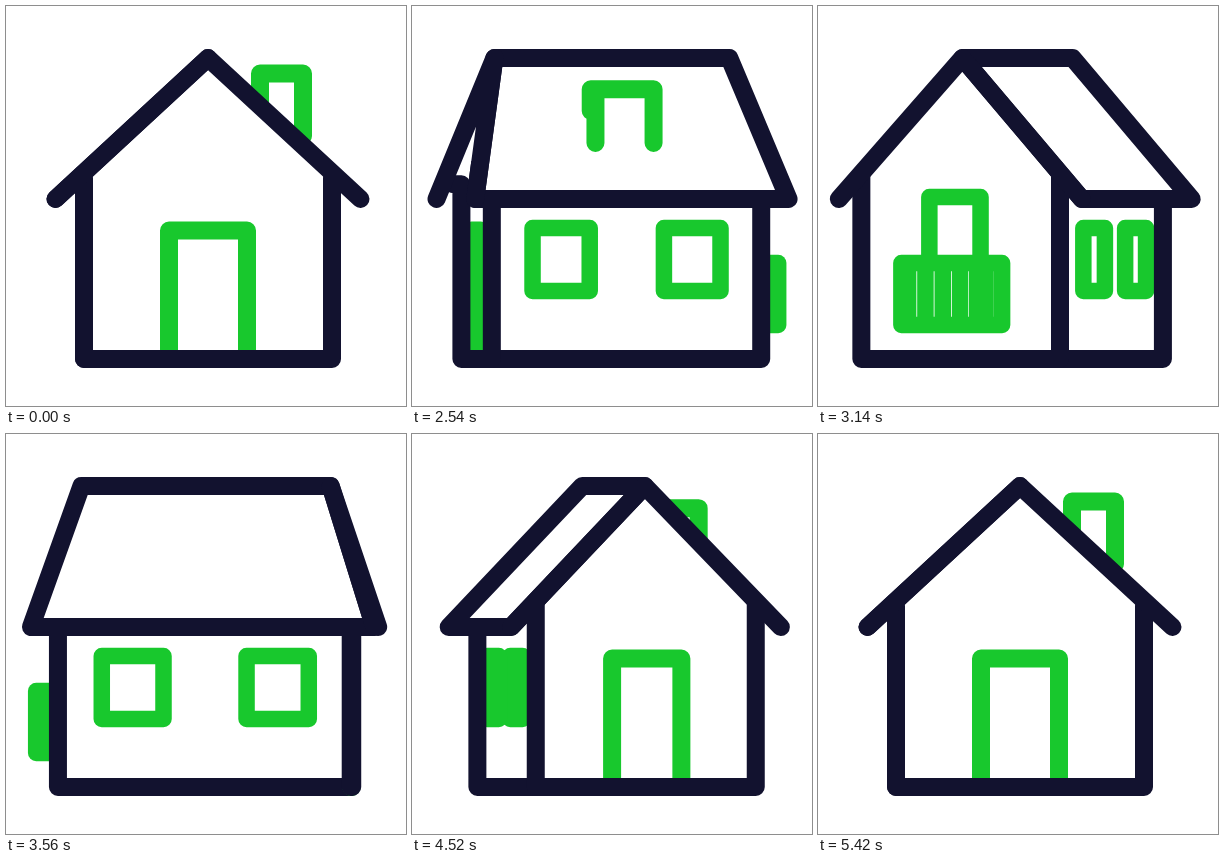
These frames come from a looping animation (400 px wide and 400 px high, 5.45 s). An HTML page:

```html
<!DOCTYPE html>
<html lang="en">
<head>
<meta charset="utf-8">
<title>Turning house</title>
<style>
  html, body { margin: 0; width: 100%; height: 100%; overflow: hidden; background: #fff; }
  svg { display: block; width: 100vw; height: 100vh; }
  path { stroke-linecap: round; stroke-linejoin: round; }
</style>
</head>
<body>
<svg viewBox="0 0 400 400"><g id="house"></g></svg>
<script>
const NAVY = '#12122f', GREEN = '#18c82d';
const LOOP = 5450, START = 2030, TURN = 3390, STEP = 30;
const RIDGE = 52, EAVE = 193, GROUND = 353;
const house = document.getElementById('house');

// Cubic bezier easing, solved by bisection
function ease(x) {
  if (x <= 0) return 0;
  if (x >= 1) return 1;
  const bezier = (s, a, b) => 3 * (1 - s) ** 2 * s * a + 3 * (1 - s) * s * s * b + s ** 3;
  let low = 0, high = 1;
  for (let i = 0; i < 30; i++) {
    const mid = (low + high) / 2;
    if (bezier(mid, 0.165, 0.25) < x) low = mid; else high = mid;
  }
  return bezier(low, 0.01, 1);
}

const line = (...points) => 'M' + points.map(p => p.map(n => n.toFixed(2)).join(' ')).join('L');
const box = (l, t, r, b) => line([l, t], [r, t], [r, b], [l, b]) + 'Z';
const arch = (l, t, r, b) => line([l, b], [l, t], [r, t], [r, b]);
const draw = (d, color, width = 18, fill = 'none') =>
  `<path d="${d}" stroke="${color}" stroke-width="${width}" fill="${fill}"/>`;
const area = d => `<path d="${d}" fill="#fff"/>`;

// turn: 0 to 8, in eighths of a full rotation
function render(turn) {
  const quarter = Math.min(3, Math.floor(turn / 2));
  const mirrored = quarter % 2 === 1;
  const rest = turn - quarter * 2;
  const s = mirrored ? 2 - rest : rest;
  const u = Math.min(s, 1), v = Math.max(s - 1, 0);
  const shift = [1.3, 0, 0, -2][quarter] * (1 - u);
  const frontGable = quarter === 0 || quarter === 3;
  const chimneySide = quarter < 2;

  // Blend the gable view, the diagonal view and the side view
  const mix = (a, b, c) => v > 0 ? b + (c - b) * v : a + (b - a) * u;
  const px = (a, b, c) => mix(a, b, c) + shift;

  const wallL = px(76, 27.6, 54), corner = px(324, 202.4, 54), wallR = px(324, 355, 348);
  const eaveL = px(47.5, 8, 28), eaveMid = px(352.5, 221, 30), eaveR = px(352.5, 384, 375);
  const apex = px(200, 117.6, 75), ridge = px(200, 281, 325);
  const topL = mix(172, 170, 180), topMid = mix(172, 170, 195);
  let out = '';

  if (!chimneySide) {
    const l = px(105, 130, 150), r = px(148, 160, 190), top = mix(67.5, 85, 85);
    out += draw(line([l, 130], [l, top], [r, top], [r, 105]), GREEN, 18, '#fff');
  }
  if (frontGable)
    out += draw(box(px(300, 330, 356), 257, px(320, 348, 370), 319), GREEN, 16.5, '#fff');

  // Long wall with its windows
  out += area(box(corner, EAVE, wallR, GROUND));
  const panes = [[237, 96], [269, 158.5], [299, 242], [330, 304]].map(([b, c]) => px(324, b, c));
  out += draw(box(panes[0], 222, panes[1], 285), GREEN, 16.5);
  out += draw(box(panes[2], 222, panes[3], 285), GREEN, 16.5);
  out += draw(line([corner, GROUND], [wallR, GROUND], [wallR, EAVE]), NAVY);

  // Gable wall
  out += area(line([wallL, GROUND], [wallL, topL], [apex, RIDGE], [corner, topMid], [corner, GROUND]));
  if (frontGable) {
    out += draw(arch(px(161, 84.8, 54), 224.5, px(239, 140, 54), GROUND), GREEN);
  } else {
    out += draw(arch(px(168, 84, 54), 191, px(232, 129, 54), 290), GREEN, 16.5);
    let rails = box(px(137, 57.5, 30), 257, px(263, 146, 54), 319);
    for (let i = 0; i < 6; i++) {
      const x = px(137 + 25.2 * i, Math.min(67.5 + 13.5 * i, 121.3), 34 + 4 * i);
      rails += line([x, 257], [x, 319]);
    }
    out += draw(rails, GREEN, 16.5, '#fff');
  }
  out += draw(line([wallL - 10 * v, topL], [wallL, topL], [wallL, GROUND], [corner, GROUND], [corner, topMid]), NAVY);

  // Roof slope
  out += draw(line([apex, RIDGE], [ridge, RIDGE], [eaveR, EAVE], [eaveMid, EAVE]) + 'Z', NAVY, 18, '#fff');

  if (chimneySide) {
    const back = quarter === 1 ? 10 : 0;
    const a = px(252, 203, 173.6 - back), b = px(295, 226, 174.5 - back), c = px(295, 268, 236 - back);
    const top = mix(67.5, 85, 83);
    out += area(line([a, 105], [a, top], [c, top], [c, 137], [b, 137]));
    out += draw(line([a, 105], [a, top], [c, top], [c, 137]) + line([b, 137], [b, top]), GREEN);
    // The gable peak hides the chimney behind it
    const along = end => apex + (end - apex) * 0.73;
    out += area(line([apex, RIDGE], [along(eaveL), 155], [along(eaveMid), 155]));
  }

  out += draw(line([eaveL, EAVE], [apex, RIDGE], [eaveMid, EAVE]), NAVY);

  house.setAttribute('transform', mirrored ? 'translate(400 0) scale(-1 1)' : '');
  house.innerHTML = out;
}

const begin = performance.now();
let shown = -1;
function frame() {
  const time = (performance.now() - begin) % LOOP;
  const elapsed = Math.floor((time - START) / STEP) * STEP;
  const turn = time < START ? 8 : 8 * ease(elapsed / TURN);
  if (turn !== shown) render(shown = turn);
  requestAnimationFrame(frame);
}
frame();
</script>
</body>
</html>
```
